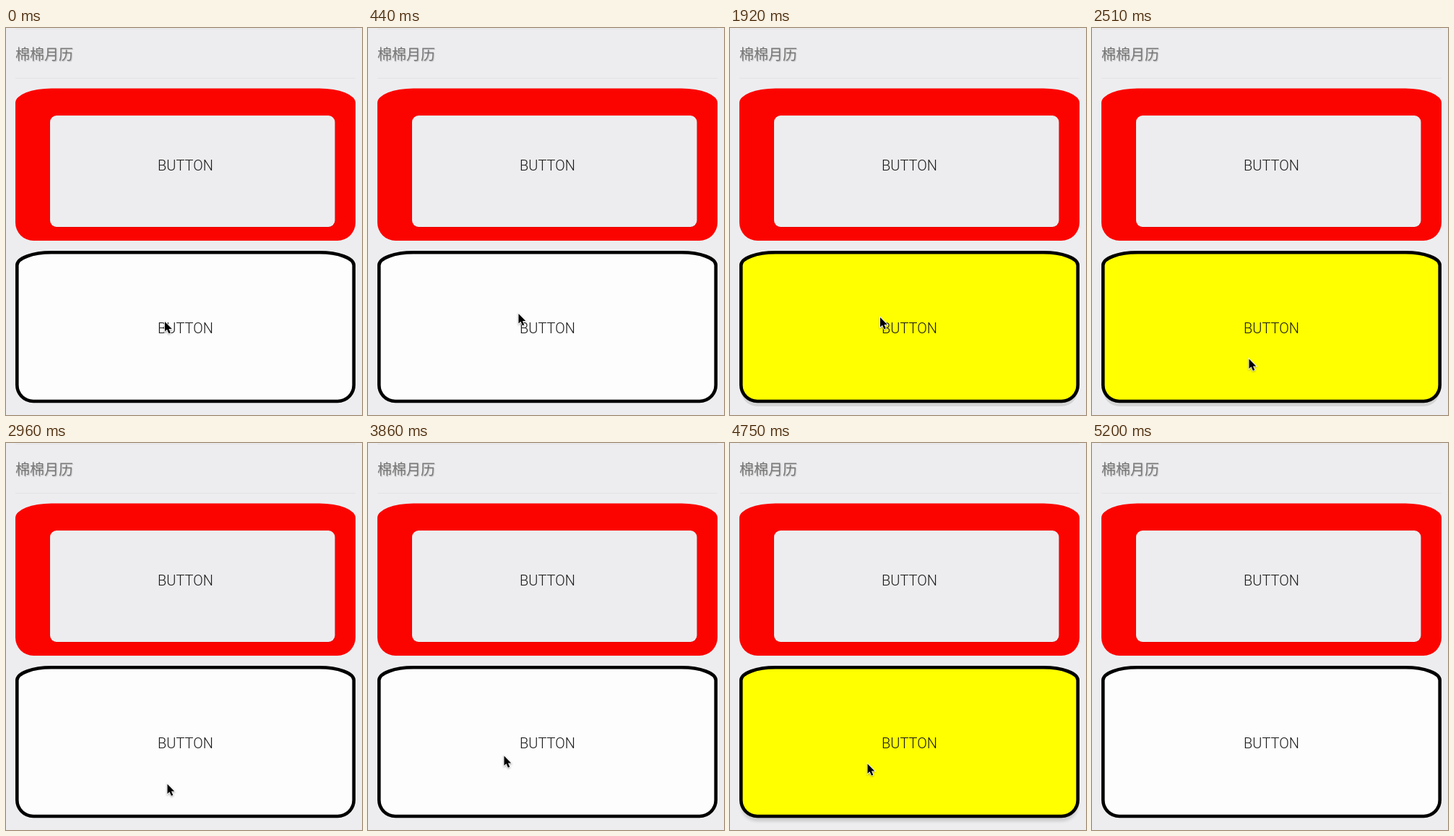
Write an HTML page that moves like this. It is 493 px wide and 535 px high and loops after 6.13 s.

```html
<!DOCTYPE html>
<html lang="zh">
<head>
<meta charset="utf-8">
<style>
html, body { margin: 0; width: 100%; height: 100%; overflow: hidden; background: #ededef; }
svg { display: block; }
.title { font: 20px "Noto Sans CJK SC", "Noto Sans CJK", sans-serif; fill: #777; text-shadow: 1px 1px 1px #0003; }
.label { font: 300 20px Roboto, sans-serif; fill: #1c1c1c; text-anchor: middle; }
</style>
</head>
<body>
<svg width="493" height="535" viewBox="0 0 493 535">
  <path d="M13 1.5H484M13 69.5H484" stroke="#e3e3e5"/>
  <text class="title" x="13" y="44">棉棉月历</text>

  <path d="M13 103.5A50 20 0 0 1 63 83.5H434A50 20 0 0 1 484 103.5V269A25 25 0 0 1 459 294H38A25 25 0 0 1 13 269Z" fill="#fb0400"/>
  <rect x="61" y="121.5" width="395" height="154" rx="9" fill="#b00" opacity=".6"/>
  <rect x="61" y="121" width="394.5" height="154" rx="9" fill="#ededef"/>
  <text class="label" x="248.5" y="197">BUTTON</text>

  <use id="shadow" href="#panel" y="7"/>
  <g id="card" stroke="#000" stroke-width="4.6">
    <path id="panel" d="M15.3 328A47.7 17.7 0 0 1 63 310.3H434A47.7 17.7 0 0 1 481.7 328V493.5A22.5 22.5 0 0 1 459.2 516H37.8A22.5 22.5 0 0 1 15.3 493.5Z"/>
  </g>
  <text class="label" x="248.5" y="421.5">BUTTON</text>

  <path id="cursor" d="M0 0V13.6L3 10.8 5.4 16.2 7.8 15.2 5.5 10H9.8Z" stroke="#fff" stroke-width="1.6"
    paint-order="stroke" style="filter: drop-shadow(0 1px 1px #0005)"/>
</svg>
<script>
const LOOP = 6130;
const [shadow, card, cursor] = ["shadow", "card", "cursor"].map(id => document.getElementById(id));

// time, pointer x, pointer y
const moves = [
  [0, 220, 406], [150, 216, 405], [290, 209, 396], [440, 208.5, 395],
  [1920, 208, 400], [2070, 212, 411], [2210, 215, 430], [2360, 217, 456],
  [2510, 217.5, 457.5], [2960, 223.5, 471.5], [3110, 224, 473], [3260, 225, 473],
  [3710, 219, 466], [3860, 188.5, 432.5], [4610, 190, 442], [4750, 190.5, 443.5],
  [4900, 191, 448], [5050, 257, 526]
];
const within = (t, a, b) => t >= a && t < b;

function draw(now) {
  const t = now % LOOP;
  const [, x, y] = moves.findLast(m => m[0] <= t);
  cursor.setAttribute("transform", `translate(${x} ${y})`);
  cursor.style.display = t < 5200 ? "" : "none";

  const pressed = within(t, 1030, 2960) || within(t, 4310, 4900);
  card.setAttribute("fill", pressed ? "#ff0" : "#fdfdfd");

  const firm = within(t, 1180, 2960), soft = within(t, 4310, 5050);
  shadow.style.opacity = firm ? .1 : soft ? .14 : 0;
  shadow.style.filter = `blur(${firm ? .6 : 2.2}px)`;
  requestAnimationFrame(draw);
}
draw(0);
</script>
</body>
</html>
```
